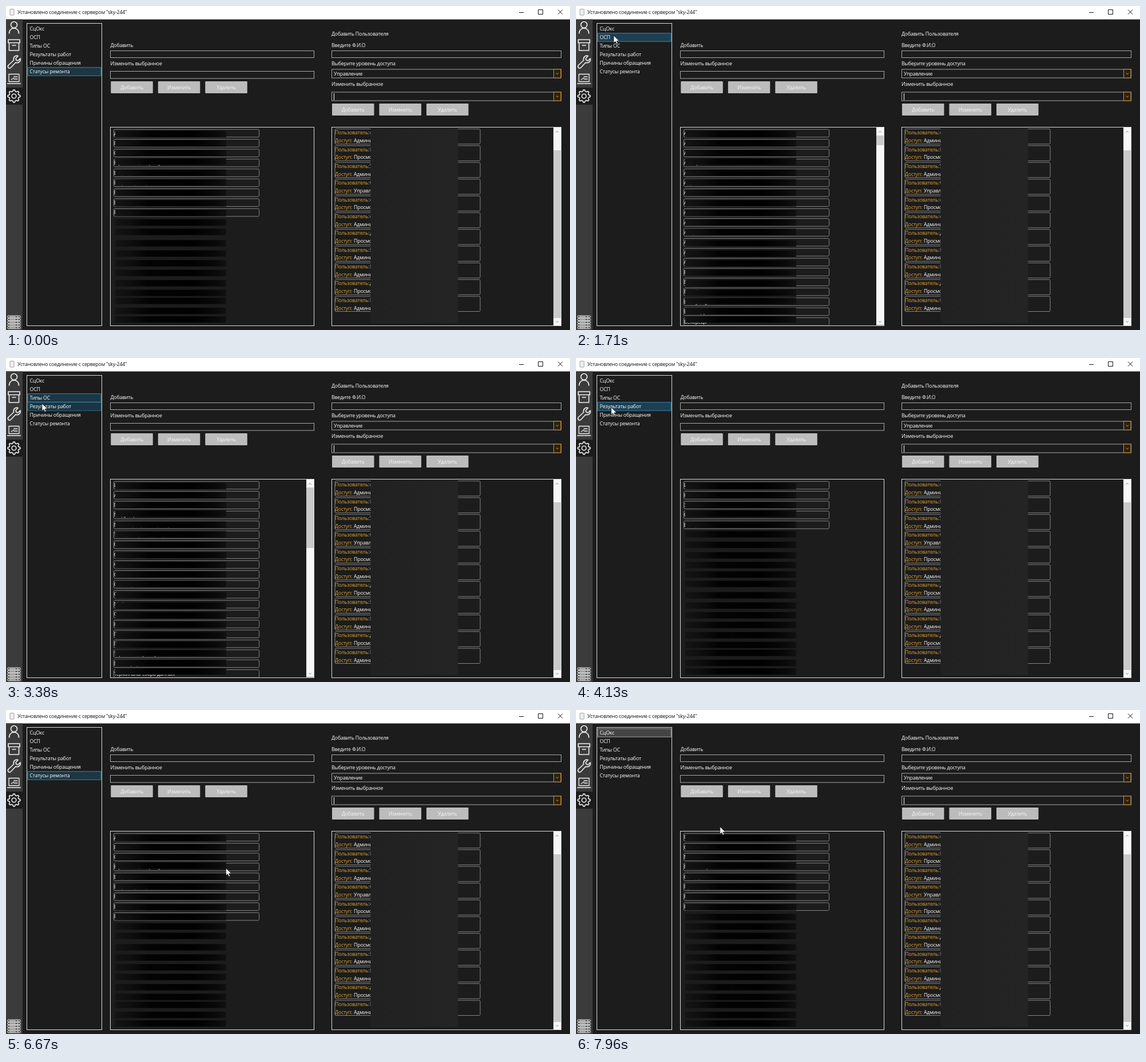
An HTML page that plays this animation: 986 px wide and 568 px high, repeating every 8 s.

```html
<!DOCTYPE html>
<html lang="ru">
<head>
<meta charset="utf-8">
<style>
html, body { margin: 0; width: 100%; height: 100%; overflow: hidden; background: #1c1c1c; }
svg { display: block; width: 986px; height: 568px; }
text { font: 8.8px "Open Sans", "Noto Sans", sans-serif; letter-spacing: -0.2px; white-space: pre; }
.icon { fill: none; stroke: #f4f4f4; stroke-width: 1.6; stroke-linejoin: round; stroke-linecap: round; }
</style>
</head>
<body>
<svg id="stage" viewBox="0 0 986 568"></svg>
<script>
const LOOP = 8000;
const BG = '#1c1c1c', LINE = '#dcdcdc', DIM = '#858585', GOLD = '#dca032';
const ROW = 17.38, USER = 29.35;

const menu = ['СцОкс', 'ОСП', 'Типы ОС', 'Результаты работ', 'Причины обращения', 'Статусы ремонта'];
const lists = [
  'Приём|Связь|Монтаж|Почта и архив|Склад узлов|Пункт сбора|Выдача|Ремонт',
  'Азов|Аксай|Алатай|Абак р|Анива|Ару|Атка|Алдан|Абан|Амга|Анар|Ачит|Аша|Аян|Бавлы|Бакал|Балей|Бахмут, цу|Белый ручей|Белорецк',
  'Иное|Адаптер|Гарнитура|Модуль р|Монитор, проектор и др|Телефон проводной р|Сканер|Сеть|Факс|Сервер|Стример|Стол|Мой экран|Стенд|Ноутбук|Планшет|Принтер|Терминал, прибор|Плоттер цв|Терминалы сбора данных',
  'Исправлено|Настройка|Замена|Списание|Возврат',
  'Сбой|Поломка|Осмотр',
  'Диагностика|Готово|Списано|В ремонте, сборка узлов|В процессе|В пути, проверка|Выдано|Возврат|В очереди'
].map(s => s.split('|'));
const access = 'АПАУПАПААПА';
const level = { А: 'Администратор', П: 'Просмотр', У: 'Управление' };
const initials = 'оПУСооДПНДН';

// Vertical centres of the dark strips over the left list
const strips = [224.5, 241, 258, 273, 292, 309, 327.5, 346, 363, 379.5, 396, 416, 434, 451, 468, 486, 503, 517, 534.5, 549.5];

// time, selected menu row
const picks = [[0, 5], [800, 0], [1540, 1], [2380, 2], [3560, 3], [4500, 4], [5920, 5], [7710, 0]];
// time, x, y of the pointer tip
const path = [
  [0, 650, 405], [40, 637, 400], [600, 72, 38], [830, 66, 37], [950, 66, 38], [1380, 66, 51],
  [1710, 66, 52], [2000, 66, 52], [2330, 64, 66], [2900, 64, 67], [3170, 64, 78], [3380, 63, 80],
  [4000, 62, 80], [4330, 61, 97], [5170, 61, 102], [5630, 60, 110], [6500, 60, 109],
  [6580, 140, 135], [6670, 382, 276], [6830, 798, 527], [6930, 700, 505], [7709, 650, 499],
  [7710, 588, 483], [7960, 252, 205], [8000, 245, 198]
];

const rect = (x, y, w, h, fill = 'none', stroke = 'none', rx = 0, id = '') =>
  `<rect x="${x}" y="${y}" width="${w}" height="${h}" rx="${rx}" fill="${fill}" stroke="${stroke}"${id && ` id="${id}"`}/>`;
const text = (x, y, s, fill = '#fff', anchor = 'start') =>
  `<text x="${x}" y="${y}" fill="${fill}" text-anchor="${anchor}">${s}</text>`;
const line = (d, stroke, w = 1) => `<path d="${d}" fill="none" stroke="${stroke}" stroke-width="${w}"/>`;
const chevron = (x, y, dir, color) => line(`M${x - 2.2} ${y - dir}l2.2 ${2 * dir}l2.2 ${-2 * dir}`, color);
const each = (n, f) => Array.from({ length: n }, (_, i) => f(i)).join('');

function titleBar() {
  return rect(0, 0, 986, 23.5, '#fff') + rect(7, 5.5, 7, 10.5, '#f2f2f2', '#999', 1) +
    text(20, 14.3, 'Установлено соединение с сервером "sky-244"', '#111') +
    line('M897 11.5h8M930.5 6.5h8v8h-8zM965 6.5l8 8m0-8l-8 8', '#111');
}

function sidebar() {
  const gear = each(32, i => {
    const a = (i - 0.5) * Math.PI / 16, r = i % 4 < 2 ? 11 : 8.4;
    return `${(14 + r * Math.cos(a)).toFixed(1)},${(158 + r * Math.sin(a)).toFixed(1)} `;
  });
  return rect(0, 23.5, 29, 545, '#3b3b3b') + rect(0, 143, 29, 30, BG) + `<g class="icon">
    <circle cx="14" cy="33" r="5.5"/><path d="M5.5 48c0-12 17-12 17 0"/>
    <path d="M4 59h20v5.500h-20zM5.500 64.500h17v13.500h-17zM11 69h6"/>
    <path d="M4 104L13.500 95C12 90 16 86 21 87.500L17 92L18 95L21 96L25 92C26 97 22 101 17 99L8 108.500C5.500 110.500 2 107 4 104z"/>
    <path d="M5 119.500h18v13h-18zM2.500 136h23M9 129l5-3M14 124h6M14 128h6" stroke-width="1.300"/>
    <polygon points="${gear}"/><circle cx="14" cy="158" r="3.800"/></g>` +
    each(5, i => rect(3, 543 + i * 4.8, 22, 3.6, '#444', '#f4f4f4', 1) +
      line(`M6 ${544.8 + i * 4.8}h11m2 0h3`, '#f4f4f4', 1));
}

function buttons(x, y) {
  return ['Добавить', 'Изменить', 'Удалить'].map((s, i) =>
    rect(x + i * 82.5, y, 73.5, 21, '#bcbcbc', 'none', 1) +
    text(x + 36.8 + i * 82.5, y + 14, s, '#f6f6f6', 'middle')).join('');
}

function combo(y, s) {
  return rect(569.5, y, 401, 15, BG, '#a8a8a8') + text(573, y + 11, s) +
    rect(957.5, y, 12.5, 15, '#2a2114', '#c98f2c') + chevron(963.8, y + 7.5, 1, GOLD);
}

function forms() {
  return text(182.5, 71.5, 'Добавить') + rect(182.5, 78.5, 356, 12, BG, '#a8a8a8') +
    text(182.5, 104.3, 'Изменить выбранное') + rect(182.5, 114.5, 356, 12.5, BG, '#a8a8a8') +
    buttons(183.3, 132) +
    text(569, 52, 'Добавить Пользователя') + text(569, 71.5, 'Введите Ф.И.О') +
    rect(569.5, 78.5, 401, 12, BG, '#a8a8a8') +
    text(569, 104.3, 'Выберите уровень доступа') + combo(111, 'Управление') +
    text(569, 140.3, 'Изменить выбранное') + combo(151, '') +
    line('M573.5 153v12', '#fff') + buttons(570, 171);
}

function scrollBar(x, top, h) {
  return rect(x, 213, 13, 347, '#f7f7f7') + rect(x, top, 13, h, '#cacaca') +
    chevron(x + 6.5, 220.5, -1, '#777') + chevron(x + 6.5, 553.5, 1, '#777');
}

function list(rows, n) {
  const body = rows.map((s, i) => {
    const y = 223 + i * ROW;
    return rect(188.5, y - 6.8, 254, 13.6, 'none', DIM, 2) + text(188.8, y + (i === 19 ? 4.2 : 3.2), s);
  }).join('');
  const bar = rows.length > 19 ? scrollBar(525, 227, n === 1 ? 17 : 106) : '';
  return `<g class="list" clip-path="url(#view)">${body}${bar}</g>`;
}

function users() {
  return each(access.length, i => {
    const y = 216 + i * USER;
    return rect(575, y - 0.5, 254, 26.5, 'none', DIM, 2) +
      text(575, y + 9.3, 'Пользователь: ', GOLD) + text(636, y + 9.3, initials[i]) +
      text(575, y + 23, 'Доступ:', GOLD) + text(608, y + 23, level[access[i]]);
  });
}

const stage = document.getElementById('stage');
stage.innerHTML = `<defs>
  <linearGradient id="ink"><stop stop-color="#141414"/><stop offset=".15" stop-color="#0d0d0d"/>
    <stop offset=".3" stop-color="#030303"/><stop offset=".7" stop-color="#010101"/>
    <stop offset=".9" stop-color="#090909"/><stop offset="1" stop-color="#111"/></linearGradient>
  <linearGradient id="veil"><stop stop-color="#212121"/><stop offset="1" stop-color="#242424"/></linearGradient>
  <clipPath id="view"><rect x="183" y="213" width="355" height="346.500"/></clipPath></defs>` +
  rect(0, 0, 986, 568, BG) + titleBar() + sidebar() +
  rect(36.5, 30.5, 131, 530, 'none', LINE) +
  rect(38, 0, 128, 14.5, '#1a3442', '#2f6a88', 0, 'hover') +
  rect(38, 0, 128, 14.5, 'none', 'none', 0, 'pick') +
  menu.map((s, i) => text(41.5, 43.4 + i * 15, s)).join('') +
  forms() +
  rect(182.5, 212.5, 356, 348, 'none', LINE) + lists.map(list).join('') +
  rect(569.5, 212.5, 401, 348, 'none', LINE) +
  rect(571, 0, 386, 29.3, '#1a2a34', '#2c5a76', 0, 'userHover') +
  users() + scrollBar(957, 253, 294) +
  '<path id="cursor" d="M0 0V12.500L3 10L5 14.500L7 13.600L5 9.200L9.300 9z" fill="#fff" stroke="#111" stroke-width=".6"/>' +
  strips.map(y => rect(191, y - 5.6, 194, 11.2, 'url(#ink)')).join('') +
  rect(637.3, 214, 153, 342, 'url(#veil)');

const $ = id => document.getElementById(id);
const hover = $('hover'), pick = $('pick'), userHover = $('userHover'), cursor = $('cursor');
const groups = [...document.querySelectorAll('.list')];

function pointer(t) {
  const i = Math.max(1, path.findIndex(p => p[0] > t));
  const [t0, x0, y0] = path[i - 1], [t1, x1, y1] = path[i];
  const k = (t - t0) / (t1 - t0);
  return [x0 + (x1 - x0) * k, y0 + (y1 - y0) * k];
}

function place(el, y, shown) {
  el.style.display = shown ? '' : 'none';
  el.setAttribute('y', y);
}

function draw(t) {
  const [x, y] = pointer(t);
  cursor.setAttribute('transform', `translate(${x.toFixed(2)} ${y.toFixed(2)})`);

  const sel = picks.filter(p => p[0] <= t).pop()[1];
  groups.forEach((g, i) => g.style.display = i === sel ? '' : 'none');

  const over = Math.floor((y - 32.7) / 15);
  const inMenu = x > 38 && x < 166 && over >= 0 && over < menu.length;
  place(hover, 32.7 + over * 15, inMenu && over !== sel);

  const idle = t >= 7710;
  place(pick, 32.7 + sel * 15, true);
  pick.setAttribute('fill', idle ? '#444' : inMenu && over === sel ? '#1d3f52' : '#1c3644');
  pick.setAttribute('stroke', idle ? '#a0a0a0' : '#3a86ab');

  // The user row highlight trails the pointer slightly
  const [lx, ly] = pointer(Math.max(0, t - 60));
  const row = Math.floor((ly - 214.6) / USER);
  place(userHover, 214.6 + row * USER, t > 6500 && t < 6950 && lx > 571 && row >= 0 && row < access.length);
}

const start = performance.now();
function tick() {
  draw((performance.now() - start) % LOOP);
  requestAnimationFrame(tick);
}
tick();
</script>
</body>
</html>
```
